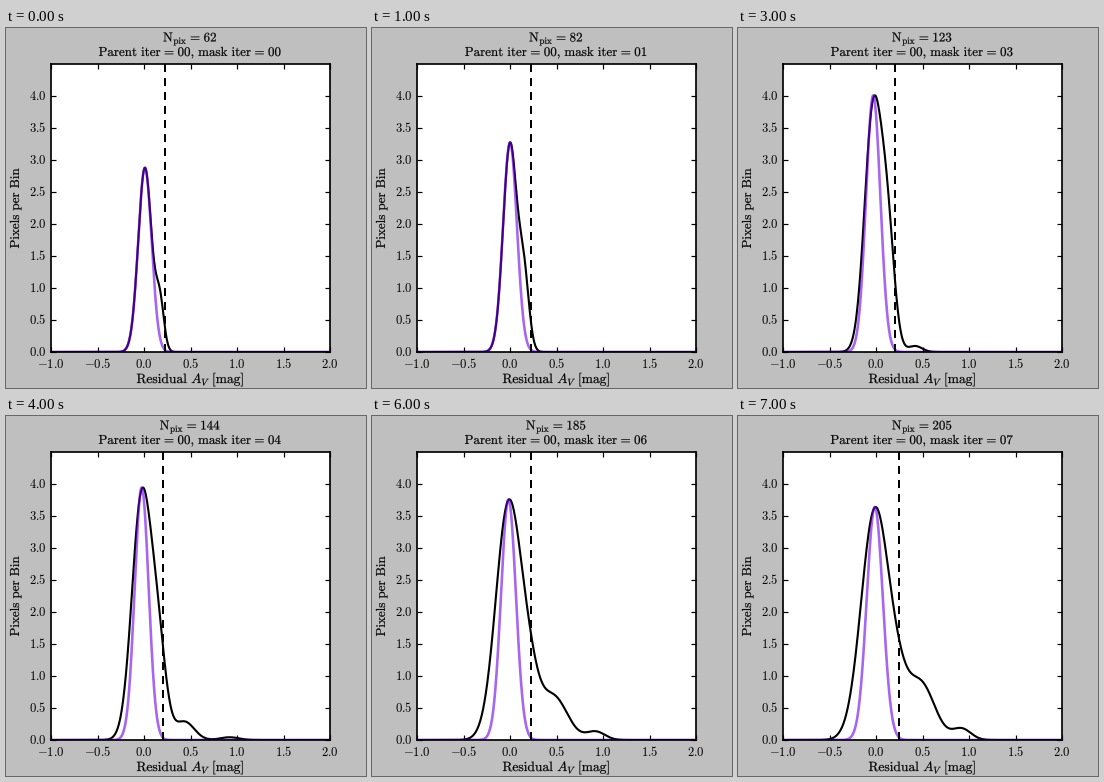
Recreate the animation shown at these times as a matplotlib script. Size 360 px wide and 360 px high, loop 8000 ms.

```python
import numpy as np
import matplotlib.pyplot as plt
from matplotlib.animation import FuncAnimation
from matplotlib.patheffects import Stroke

SIZE, DPI, STEPS = 360, 72, 8
plt.rcParams.update({"mathtext.fontset": "cm", "lines.scale_dashes": False,
                     "ytick.alignment": "center"})

VIOLET = (0.42, 0.0, 0.90, 0.6)
X = np.linspace(-1, 2, 601)

# Key values of the drifting quantities, linear in between
KEYS = [0, 2, 3, 5, 7]
PEAK = [2.88, 3.67, 4.01, 3.88, 3.64]
MEAN = [0.01, -0.01, -0.03, -0.02, -0.013]
SIGMA = [0.072, 0.077, 0.077, 0.073, 0.087]
SIDE_HEIGHT = [0.75, 1.5, 1.8, 0.93, 0.6]
SIDE_MID = [0.17, 0.13, 0.125, 0.18, 0.225]


def gauss(height, mid, sigma):
    return height * np.exp(-0.5 * ((X - mid) / sigma) ** 2)


def smooth(t):
    t = np.clip(t, 0, 1)
    return t * t * (3 - 2 * t)


def histogram(i, peak, mean, sigma, side_height, side_mid):
    """Widening core, its right flank, then a growing shoulder and tail."""
    total = gauss(peak, mean, sigma + 0.06 * smooth((i - 1) / 6))
    total += gauss(side_height, side_mid, 0.045 + 0.01 * i)
    if i > 2:
        total += gauss(0.2 * (i - 2.5), 0.42 + 0.015 * (i - 3),
                       min(0.15, 0.075 + 0.03 * (i - 3)))
        total += gauss(0.045 * (i - 3), 0.92, 0.1)
    return total * peak / total.max()


def roman(text):
    """Set plain text upright in the maths font."""
    text = text.replace(" = ", r"\hspace{0.1}=\hspace{0.1}")
    text = text.replace(", ", r",\hspace{0.15}").replace(" ", r"\hspace{0.36}")
    return rf"$\mathrm{{{text}}}$"


fig = plt.figure(figsize=(SIZE / DPI, SIZE / DPI), dpi=DPI, facecolor="0.75")
ax = fig.add_axes([0.125, 0.1, 0.775, 0.8])
ax.set(xlim=(-1, 2), ylim=(0, 4.5))
xticks = np.arange(-1, 2.1, 0.5)
yticks = np.arange(0, 4.1, 0.5)
ax.set_xticks(xticks, [f"${v:.1f}$" for v in xticks])
ax.set_yticks(yticks, [f"${v:.1f}$" for v in yticks])
ax.tick_params(direction="in", top=True, right=True, length=5, width=1.2,
               labelsize=12.6)
ax.tick_params(axis="x", pad=5.5)
ax.tick_params(axis="y", pad=4.5)
for spine in ax.spines.values():
    spine.set_linewidth(1.7)


def label(x, y, text="", size=13, rotation=0):
    """Centred text on a baseline, placed in pixels from the top left."""
    return fig.text(x / SIZE, 1 - y / SIZE, text, size=size, rotation=rotation,
                    ha="center", va="baseline", rotation_mode="anchor",
                    path_effects=[Stroke(linewidth=0.2, foreground="k")])


count_text = label(184.5, 13.5)
iter_text = label(184.5, 28)
label(184.5, 355, roman(r"Residual \mathit{A_V} [mag]"), 13.5)
label(13, 179.5, roman("Pixels per Bin"), rotation=90)

hist, = ax.plot([], [], color="k", lw=2.1)
fit, = ax.plot([], [], color=VIOLET, lw=2.6)
cut = ax.axvline(0, color="k", lw=2, ls=(0, (8, 6)), dash_capstyle="butt")


def draw(i):
    peak, mean, sigma, side_height, side_mid = (
        np.interp(i, KEYS, row)
        for row in (PEAK, MEAN, SIGMA, SIDE_HEIGHT, SIDE_MID))
    hist.set_data(X, histogram(i, peak, mean, sigma, side_height, side_mid))
    fit.set_data(X, gauss(peak, mean, sigma))
    cut.set_xdata([mean + 3 * sigma] * 2)
    count_text.set_text(roman(rf"N_{{pix}} = {int(62 + 20.5 * i)}"))
    iter_text.set_text(roman(f"Parent iter = 00, mask iter = {i:02d}"))
    return hist, fit, cut, count_text, iter_text


anim = FuncAnimation(fig, draw, frames=STEPS, interval=1000,
                     repeat=True, repeat_delay=0)
plt.show()
```
